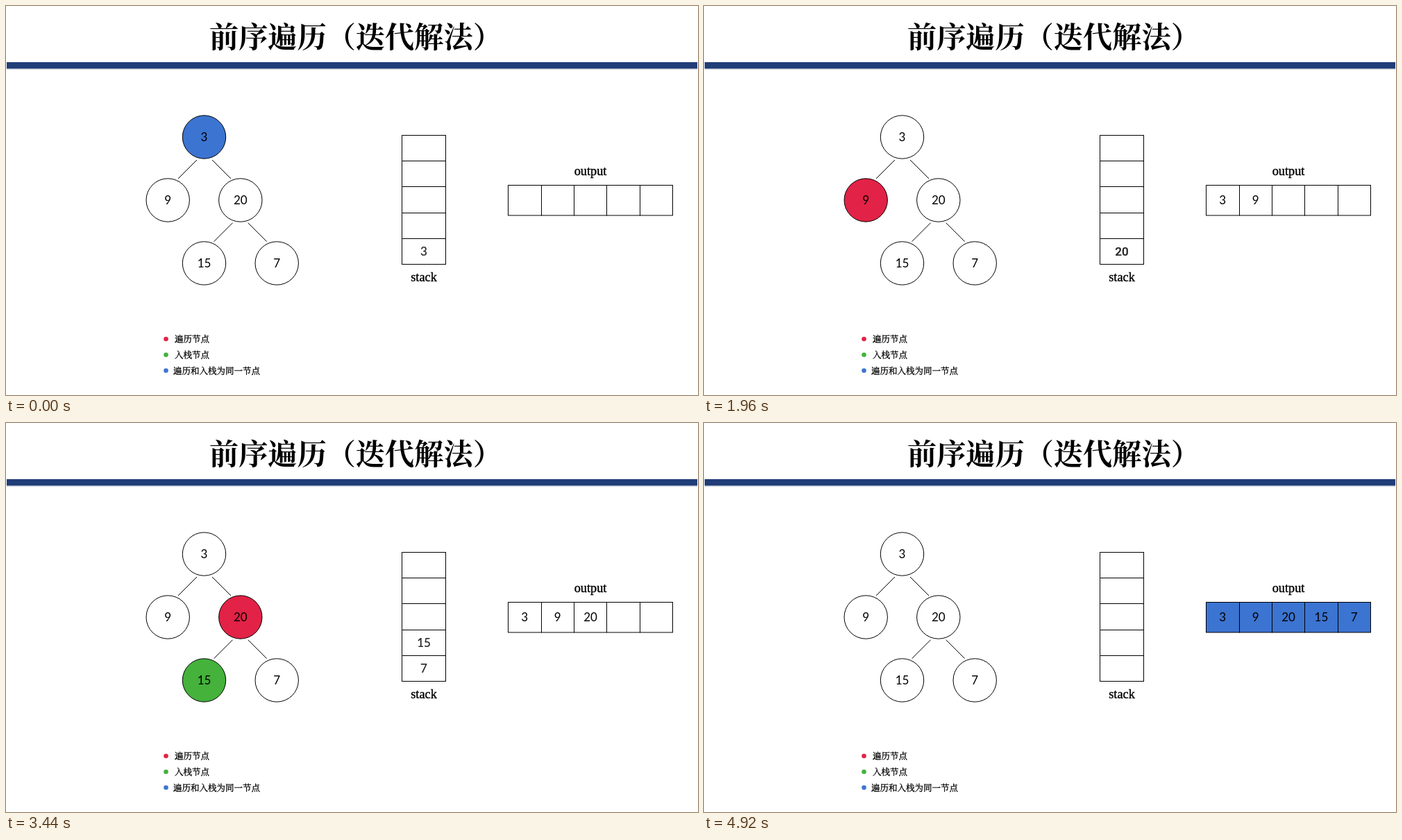
These frames come from a looping animation (997x561 px, 5.4 s). An HTML page:

```html
<!DOCTYPE html>
<html lang="zh-CN">
<meta charset="utf-8">
<title>前序遍历</title>
<style>
html, body { margin: 0; width: 100%; height: 100%; overflow: hidden; background: #fff; }
svg { display: block; width: 997px; height: 561px; }
text { font-family: "Noto Serif CJK SC", "Noto Serif SC", "Noto Sans CJK SC", serif; }
.shape { fill: #fff; stroke: #000; }
.num { font: 17px Lato, sans-serif; text-anchor: middle; }
.slot { fill: #222; stroke: #222; stroke-width: .2; }
.wide { font: 500 17px Roboto, sans-serif; }
.label { font: 18.3px "Liberation Serif", serif; text-anchor: middle; stroke: #000; stroke-width: .4; }
.legend { font-size: 12.5px; font-weight: 500; stroke: #000; stroke-width: .3; }
</style>
<svg viewBox="0 0 997 561"></svg>
<script>
const svg = document.querySelector('svg');
const RED = '#e22246', GREEN = '#44b23b', BLUE = '#3c74d1';

function add(tag, attrs, content = '') {
  const el = document.createElementNS('http://www.w3.org/2000/svg', tag);
  for (const key in attrs) el.setAttribute(key, attrs[key]);
  el.textContent = content;
  return svg.appendChild(el);
}
const number = (x, y, value = '', extra = '') => add('text', { x, y: y + 6, class: 'num ' + extra }, value);

// Grid lines sit on pixel centres, so neighbouring cells share one sharp line
const snap = v => Math.round(v) + .5;
const box = (x, y, right, bottom) =>
  add('rect', { x, y, width: right - x, height: bottom - y, class: 'shape' });

// Heading
add('text', { x: 293, y: 60, 'font-size': 42.2, 'font-weight': 700 }, '前序遍历（迭代解法）');
add('rect', { x: 1, y: 90, width: 995, height: 1.5, fill: '#bbc0ca' });
add('rect', { x: 1, y: 81, width: 995, height: 9.2, fill: '#203d78' });

// Tree
for (const [x, y] of [[286, 222], [337.6, 312.7]])
  for (const side of [-1, 1])
    add('line', { x1: x + 11 * side, y1: y, x2: x + 38 * side, y2: y + 27, class: 'shape' });
const nodes = {};
for (const [value, x, y] of [[3, 285.5, 189], [9, 233.2, 280], [20, 337.8, 280], [15, 285.5, 371], [7, 390.2, 371]]) {
  nodes[value] = add('circle', { cx: x, cy: y, r: 31.2, class: 'shape' });
  number(x, y, value);
}

// Stack slots run from the bottom up
const slotTop = i => snap(334.7 - 37.15 * i);
const slots = [0, 1, 2, 3, 4].map(i => {
  box(570.5, slotTop(i), 633.5, slotTop(i - 1));
  return number(602, 353.7 - 37.15 * i, '', 'slot');
});
add('text', { x: 602, y: 397, class: 'label' }, 'stack');

const cellLeft = i => snap(723.2 + 47.4 * i);
const cells = [3, 9, 20, 15, 7].map((value, i) => ({
  frame: box(cellLeft(i), 258.5, cellLeft(i + 1), 302),
  text: number(747.2 + 47.4 * i, 280, value)
}));
add('text', { x: 842, y: 243.5, class: 'label' }, 'output');

// Legend
[[RED, 243, '遍历节点'], [GREEN, 243, '入栈节点'], [BLUE, 241, '遍历和入栈为同一节点']].forEach(([fill, x, label], i) => {
  const y = 480.3 + 22.7 * i;
  add('circle', { cx: 230.5, cy: y, r: 3.3, fill });
  add('text', { x, y: y + 5, class: 'legend' }, label);
});

// [start, node colours, stack, output count, output colour]
const steps = [
  [0, { 3: BLUE }, [3], 0],
  [520, { 3: RED }, [], 1],
  [1000, { 3: RED, 20: GREEN }, [20], 1],
  [1480, { 3: RED, 9: GREEN }, [20, 9], 1],
  [1960, { 9: RED }, [20], 2],
  [2440, { 20: RED }, [], 3],
  [2960, { 20: RED, 7: GREEN }, [7], 3],
  [3440, { 20: RED, 15: GREEN }, [7, 15], 3],
  [3920, { 15: RED }, [7], 4],
  [4400, { 7: RED }, [], 5],
  [4920, {}, [], 5, BLUE]
];
let shown;

function show([, colours, stack, count, fill = '#fff']) {
  for (const value in nodes) nodes[value].style.fill = colours[value] || '#fff';
  slots.forEach((slot, i) => {
    slot.textContent = stack[i] ?? '';
    slot.classList.toggle('wide', stack[i] === 20);
  });
  cells.forEach(({ frame, text }, i) => {
    text.style.display = i < count ? '' : 'none';
    frame.style.fill = fill;
  });
}

const begin = performance.now();
function tick() {
  const time = (performance.now() - begin) % 5400;
  const step = steps.findLast(([start]) => start <= time);
  if (step !== shown) show(shown = step);
  requestAnimationFrame(tick);
}
tick();
</script>
</html>
```
